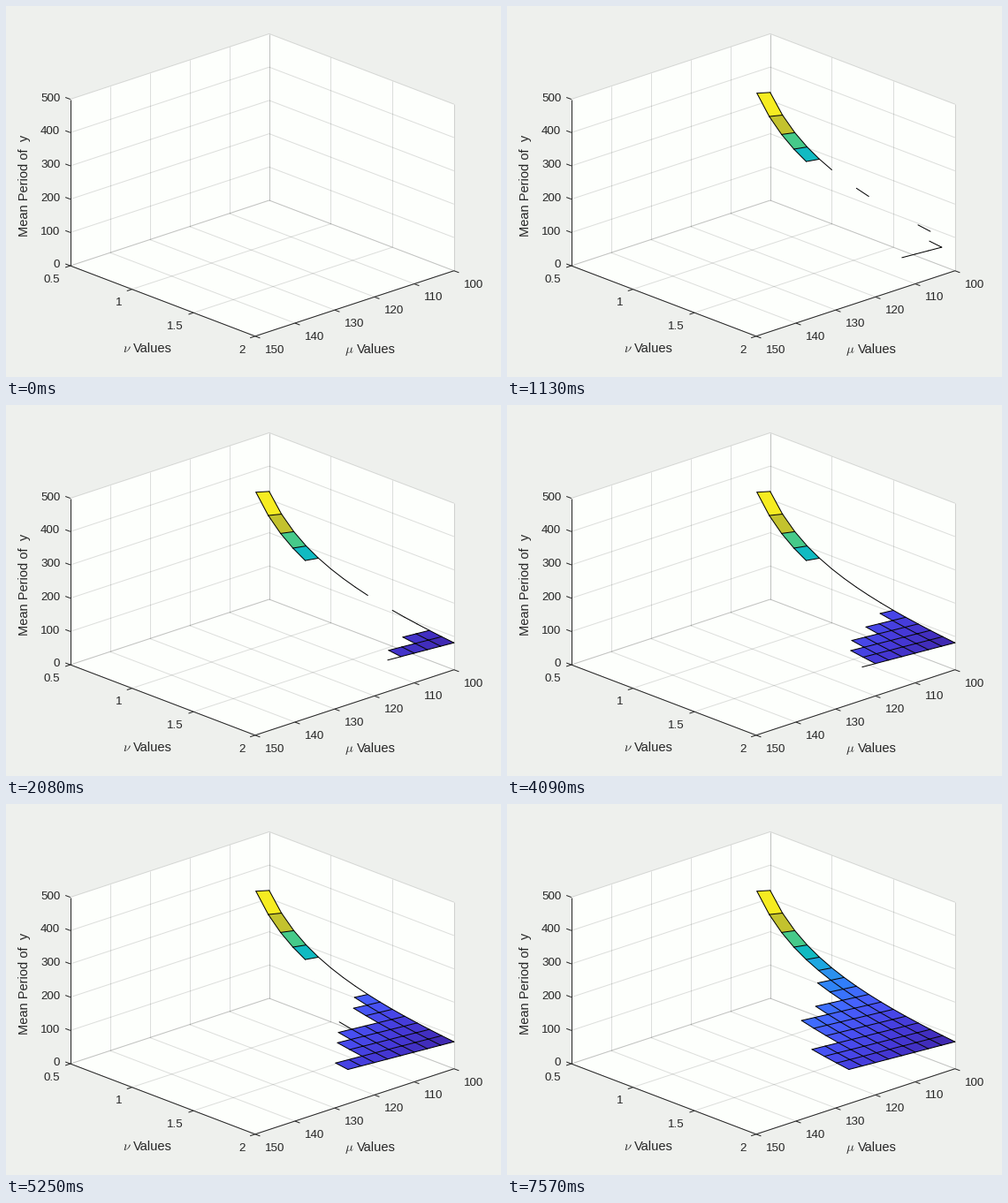
Animation of 560 by 420 pixels, one loop 8 s. Source, as a matplotlib script:

```python
import numpy as np
import matplotlib.pyplot as plt
from matplotlib.animation import FuncAnimation
from matplotlib.collections import LineCollection, PolyCollection
from matplotlib.colors import LinearSegmentedColormap

DPI, W, H = 80, 560, 420
PX = 72 / DPI                      # one pixel in points
LOOP, STEP = 8000, 20
N = 16                             # samples along each parameter
K = 1.62                           # period = K * mu / nu
INK = "#262626"

# Orthographic view of a unit cube stretched to fill the plot area
AZ, EL = np.radians([47.1, 30])
LEFT, RIGHT, TOP, BOTTOM = 0.13 * W, 0.905 * W, 0.075 * H, 0.89 * H
SPAN = np.sin(AZ) + np.cos(AZ)
SX = (RIGHT - LEFT) / SPAN
SY = (BOTTOM - TOP) / (SPAN * np.sin(EL) + np.cos(EL))

PARULA = LinearSegmentedColormap.from_list("parula_like", [
    ((i - 1) / 63, "#" + c) for i, c in zip(
        list(range(1, 62, 4)) + [64],
        "3e26a8 4537d5 484df0 4563fd 327cfc 2b91ef 20a5e3 08b5d0 19bfb6 "
        "37c897 64cd6f 9dc943 d1bf27 f8ba3d fccf30 f5e924 f9fb15".split())])

# Start time, last solved mu index for each nu ('.' = none), stray solved points
STAGES = [
    (0, "................", []),
    (830, "0000............", [(15, 1), (15, 2), (15, 3)]),
    (1130, "111110.00...00..",
     [(14, 1), (15, 1), (15, 2), (15, 3), (15, 4)]),
    (2080, "111110000.000245", []),
    (3230, "1111100000002566", []),
    (4090, "1111100000135667", []),
    (5250, "1111100012256688", [(10, 4)]),
    (6410, "1111100224566888", []),
    (7570, "1111112246668888", []),
]


def project(nu, mu, z):
    u, v, w = (nu - 0.5) / 1.5, (150 - mu) / 50, z / 500
    x = LEFT + SX * (u * np.cos(AZ) + v * np.sin(AZ))
    depth = (1 - u) * np.sin(AZ) + v * np.cos(AZ)
    return x, BOTTOM - SY * (depth * np.sin(EL) + w * np.cos(EL))


def solve(i, j):
    nu, mu = 0.5 + 0.1 * i, 100 + 50 * j / (N - 1)
    return nu, mu, K * mu / nu


def vertex(i, j):
    return project(*solve(i, j))


Z_MIN, Z_MAX = solve(N - 1, 0)[2], solve(0, 1)[2]


def build(depths, extras):
    """Faces, face colours and mesh edges for a partly solved grid."""
    known = {(i, j) for i, d in enumerate(depths) if d != "."
             for j in range(int(d) + 1)} | set(extras)
    faces, colors, edges = [], [], []
    for i, j in sorted(known):
        for p in ((i + 1, j), (i, j + 1)):
            if p in known:
                edges.append([vertex(i, j), vertex(*p)])
        ring = [(i, j), (i + 1, j), (i + 1, j + 1), (i, j + 1)]
        if known.issuperset(ring):
            faces.append([vertex(*p) for p in ring])
            level = (solve(i, j)[2] - Z_MIN) / (Z_MAX - Z_MIN)
            colors.append(PARULA(level))
    return faces, colors, edges


fig = plt.figure(figsize=(W / DPI, H / DPI), dpi=DPI, facecolor="#eef0ed")
ax = fig.add_axes([0, 0, 1, 1])
ax.set(xlim=(0, W), ylim=(H, 0))
ax.axis("off")


def label(x, y, s, size=13.33, ha="left", **kw):
    ax.text(x, y, s, fontsize=size * PX, family="Liberation Sans", color=INK,
            ha=ha, va="baseline", rotation_mode="anchor", **kw)


def lines(segments, color, **kw):
    ax.add_collection(LineCollection(segments, colors=color,
                                     linewidths=PX, **kw))


nus, mus, zs = np.arange(0.5, 2.1, 0.5), range(100, 151, 10), range(0, 501, 100)

# White floor and back walls
outline = [project(0.5, 150, 0), project(2, 150, 0), project(2, 100, 0),
           project(2, 100, 500), project(0.5, 100, 500), project(0.5, 150, 500)]
ax.add_collection(PolyCollection([outline], facecolors="#fdfffc",
                                 edgecolors="none", zorder=0))

# Each plane has its own grid, so shared edges come out darker
grid = []
for n in nus:
    grid += [[project(n, 150, 0), project(n, 100, 0)],
             [project(n, 100, 0), project(n, 100, 500)]]
for m in mus:
    grid += [[project(0.5, m, 0), project(2, m, 0)],
             [project(0.5, m, 0), project(0.5, m, 500)]]
for z in zs:
    grid += [[project(0.5, 150, z), project(0.5, 100, z)],
             [project(0.5, 100, z), project(2, 100, z)]]
lines(grid, INK, alpha=0.15, zorder=1)

# Axis lines, ticks and tick labels
rules = [[project(0.5, 150, 500), project(0.5, 150, 0)],
         [project(0.5, 150, 0), project(2, 150, 0)],
         [project(2, 150, 0), project(2, 100, 0)]]


def tick(point, dx, dy):
    x, y = point
    rules.append([(x, y), (x + dx, y + dy)])
    return x, y


for z in zs:
    x, y = tick(project(0.5, 150, z), -5.6, -2.1)
    label(x - 11.5, y + 2.2, str(z), ha="right")
for n in nus:
    x, y = tick(project(n, 150, 0), -5.7, 1.9)
    label(x - 11.5, y + 18.8, f"{n:g}", ha="right")
for m in mus:
    x, y = tick(project(2, m, 0), 5.6, 2.1)
    label(x + 11, y + 18.8, str(m))
lines(rules, INK, zorder=2)

# Axis titles
label(131.6, 392.4, r"$\nu$", 14.67, math_fontfamily="cm")
label(144.4, 392.4, "Values", 14.67)
label(382.6, 393.4, r"$\mu$", 14.67, math_fontfamily="cm")
label(396.6, 393.4, "Values", 14.67)
label(25.4, 260.6, "Mean Period of  y", 14.67, rotation=90)

skin = ax.add_collection(PolyCollection([], edgecolors="none", zorder=4))
mesh = ax.add_collection(LineCollection([], colors="black", linewidths=PX,
                                        capstyle="round", zorder=5))
meshes = [build(depths, extras) for _, depths, extras in STAGES]
starts = [s[0] for s in STAGES]


def update(k):
    now = (k + 1) * STEP - 1
    stage = np.searchsorted(starts, now, side="right") - 1
    faces, colors, edges = meshes[stage]
    skin.set_verts(faces)
    skin.set_facecolor(colors)
    mesh.set_segments(edges)
    return skin, mesh


anim = FuncAnimation(fig, update, frames=LOOP // STEP, interval=STEP,
                     init_func=lambda: update(0), repeat=True,
                     repeat_delay=0, blit=False)
plt.show()
```
